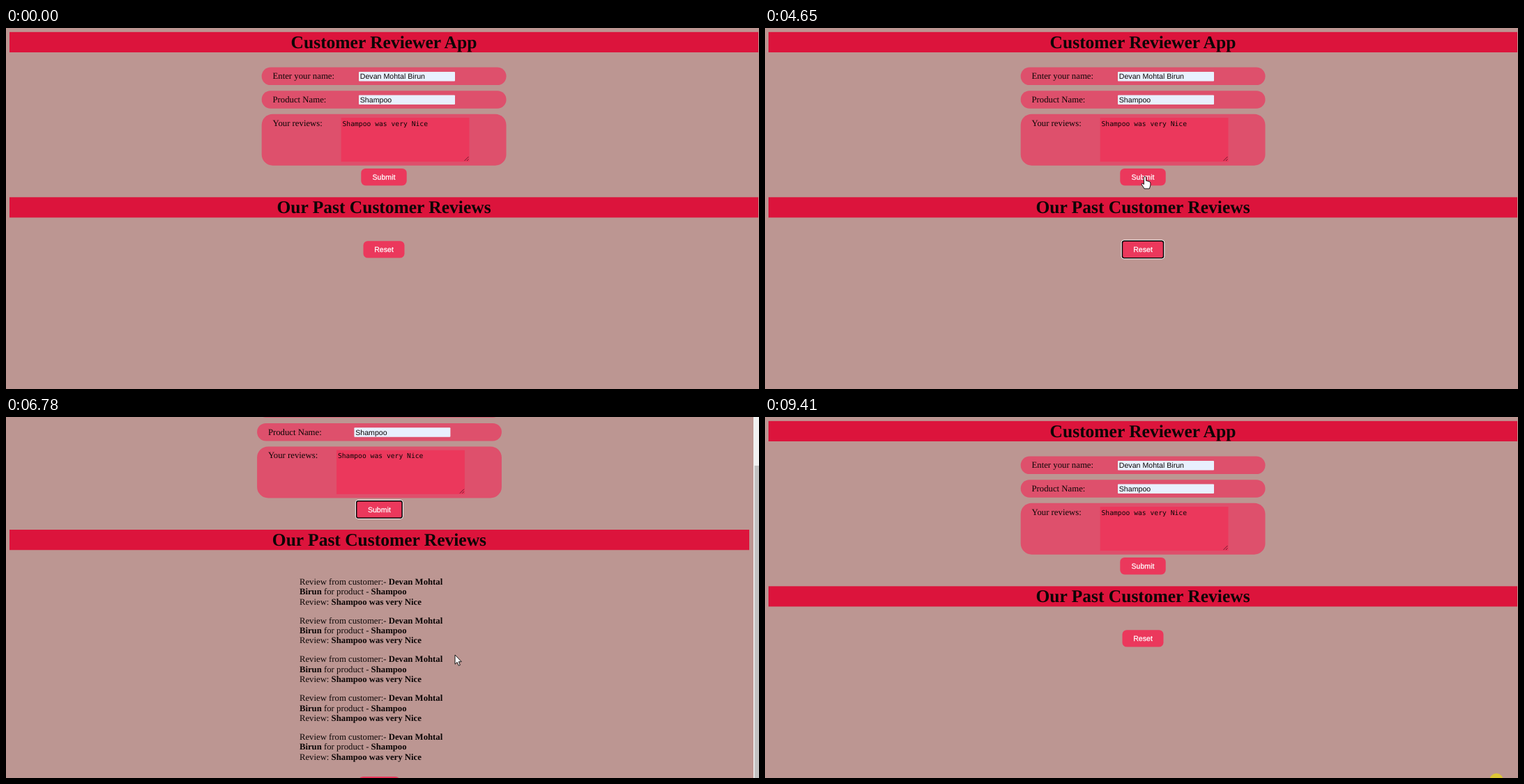
These frames come from a looping animation (1080 px wide and 519 px high, 9.48 s). An HTML page:

```html
<!DOCTYPE html>
<html lang="en">
<head>
<meta charset="utf-8">
<title>Customer Reviewer App</title>
<style>
  html, body { margin: 0; width: 100%; height: 100%; overflow: hidden; background: #bc9692; }
  svg { display: block; width: 1080px; height: 519px; }
  text { font: 12.75px "Liberation Serif", serif; fill: #0c0606; text-rendering: geometricPrecision; white-space: pre; }
  .bold { font-weight: bold; }
  text.title { font-size: 25.5px; font-weight: bold; text-anchor: middle; }
  text.field { font: 10.62px "Liberation Sans", sans-serif; }
  text.mono { font: 9.7px "DejaVu Sans Mono", monospace; }
  text.button { font: 10.62px "Liberation Sans", sans-serif; fill: #fff; stroke: #fff; stroke-width: .25; text-anchor: middle; }
  .bar { fill: #dc143c; }
  .row { fill: #de506c; }
  .input { fill: #e8f0fe; }
  .hot { fill: #eb385c; }
  .ring { fill: #000; stroke: #fff; }
  .grip { fill: none; stroke: #4a1424; stroke-width: .8; }
</style>
</head>
<body>
<svg viewBox="0 0 1080 519">
  <g id="page"></g>
  <g id="scrollbar">
    <rect x="1072" width="8" height="519" fill="#f1f1f1"/>
    <rect id="thumb" x="1073.6" width="7" fill="#c1c1c1"/>
  </g>
  <circle id="spot" r="9.7" fill="#e0cb2c" opacity=".9"/>
  <g id="cursor" stroke="#000" stroke-width=".9" stroke-linejoin="round" fill="#fff">
    <path id="arrow" d="M0 0V13.3L3.1 10.6L5.2 15.4L7.3 14.5L5.3 9.8H9.3Z"/>
    <path id="hand" d="M-1.6 1.6Q0-.8 1.6 1.6V6.5L6 7.6Q7.9 8.2 7.9 10.5V13L6.4 18H-1L-5 11.6Q-4.6 9.2-1.6 11.8Z"/>
    <path id="beam" fill="none" stroke="#cfabab" d="M-3-6.5H3M0-6.5V6.5M-3 6.5H3"/>
  </g>
</svg>
<script>
const LOOP = 9480;
const TICK = 77;
const CENTER = 542;
const NAME = ["Devan Mohtal", "Birun"];
const PRODUCT = "Shampoo";
const REVIEW = "Shampoo was very Nice";
const LINE = 14.4, REVIEW_STEP = 55.8, ROW_STEP = 33.55;
const SUBMIT_Y = 202, RESET_Y = 306.2, BUTTON_H = 24.4;
const VIEW_H = 541, EMPTY_PAGE_H = 359, MAX_SCROLL = 84.4;

const clicks = [], glides = [];
const click = (button, down, hold = 80) => clicks.push({ button, down, up: down + hold });
const glide = (start, end, ...stops) => {
  const from = glides.length ? glides[glides.length - 1].path.slice(-1)[0] : [1100, 552];
  glides.push({ start, end, path: [from, ...stops] });
};

glide(440, 1060, [520, 220]);
click("submit", 1440);
click("submit", 2150, 150);
glide(2450, 2680, [549, 458]);
glide(2910, 3400, [541, 373], [556, 457]);
glide(3550, 3630, [551, 440]);
click("reset", 3780);
glide(4010, 4400, [522, 290], [534, 179]);
glide(4570, 4650, [545, 213]);
click("submit", 4800);
click("submit", 5190, 150);
click("submit", 5510, 150);
click("submit", 5910, 70);
click("submit", 6310, 70);
glide(6610, 6780, [644, 342]);
glide(6850, 7610, [546, 513]);
click("reset", 8010, 170);
glide(8410, 9100, [690, 489], [1049, 522]);
click("", 9410);

const $ = id => document.getElementById(id);
const show = (el, on) => el.setAttribute("display", on ? "inline" : "none");
const move = (el, x, y) => el.setAttribute("transform", `translate(${x} ${y})`);

const rect = (cls, x, y, w, h, r = 0) =>
  `<rect class="${cls}" x="${x}" y="${y}" width="${w}" height="${h}" rx="${r}"/>`;
const text = (cls, x, y, content) => `<text class="${cls}" x="${x}" y="${y}">${content}</text>`;
const bold = content => `<tspan class="bold">${content}</tspan>`;

function button(id, label, w) {
  const grown = (cls, d, r) => rect(cls, CENTER - w / 2 - d, -d, w + 2 * d, BUTTON_H + 2 * d, r);
  return `<g id="${id}">${grown("hot", 0, 6.4)}` +
    `<g id="${id}Ring">${grown("ring", 1.3, 3.6)}${grown("hot", -0.7, 2)}</g>` +
    text("button", CENTER, 15.8, label) + "</g>";
}

function row(i, label, height, radius, content) {
  return `<g transform="translate(0 ${56.6 + i * ROW_STEP})">` +
    rect("row", 366.7, 0, 350.8, height, radius) +
    text("", 382.5, 16.9, label) + content + "</g>";
}

const field = value => rect("input", 506, 6.4, 138, 13.5, 1) + text("field", 507.8, 16.9, value);

const textarea = rect("hot", 480.7, 5.3, 183.8, 63.2) + text("mono", 482.5, 16.9, REVIEW) +
  `<path class="grip" d="M657.5 67.3l6-6M661 67.3l2.5-2.5"/>`;

const review = (_, i) => `<g class="review">` + [
  "Review from customer:- " + bold(NAME[0]),
  bold(NAME[1]) + " for product - " + bold(PRODUCT),
  "Review: " + bold(REVIEW),
].map((line, k) => text("", 427.5, 322 + i * REVIEW_STEP + k * LINE, line)).join("") + "</g>";

$("page").innerHTML =
  rect("bar", 5, 5.8, 1074, 29.2) + rect("bar", 5, 243.3, 1074, 29.2) +
  `<g id="content">` +
  text("title", CENTER, 28.9, "Customer Reviewer App") +
  row(0, "Enter your name:", 25.5, 12.7, field(NAME.join(" "))) +
  row(1, "Product Name:", 25.5, 12.7, field(PRODUCT)) +
  row(2, "Your reviews:", 74, 15.9, textarea) +
  button("submit", "Submit", 65.4) +
  text("title", CENTER, 266.4, "Our Past Customer Reviews") +
  Array.from({ length: 5 }, review).join("") +
  button("reset", "Reset", 59) + "</g>";

const bars = document.querySelectorAll(".bar");
const reviews = document.querySelectorAll(".review");
move($("submit"), 0, SUBMIT_Y);

function along(path, p) {
  const at = p * (path.length - 1);
  const i = Math.min(Math.floor(at), path.length - 2);
  return path[i].map((v, k) => v + (path[i + 1][k] - v) * (at - i));
}

// The pointer advances in ticks, the first one at the start of a glide
function cursorAt(t) {
  const { start, end, path } = glides.filter(g => t >= g.start).pop() || glides[0];
  const ticks = Math.floor((t - start) / TICK) + 1;
  const p = t >= end ? 1 : Math.min(1, ticks * TICK / (end - start + TICK));
  return along(path, t < start ? 0 : p);
}

function cursorKind(x, y, count, resetY) {
  const inside = (halfWidth, top, height) => Math.abs(x - CENTER) < halfWidth && y >= top && y <= top + height;
  if (inside(32.7, SUBMIT_Y, BUTTON_H) || inside(29.5, resetY - 1.5, BUTTON_H + 1.5)) return "hand";
  const overReview = count && inside(94, 311, count * REVIEW_STEP - 13);
  return inside(154, 245, 26) || inside(100, 129, 63) || overReview ? "beam" : "arrow";
}

// One wheel notch, easing out in three steps
function scrollAt(t) {
  const p = Math.min(1, Math.max(0, Math.floor((t - 6640) / 70) / 3));
  return MAX_SCROLL * (1 - (1 - p) ** 3);
}

function draw(t) {
  const pressed = clicks.filter(c => t >= c.down).pop();
  const count = clicks.filter(c => t >= c.up)
    .reduce((n, c) => c.button === "submit" ? n + 1 : 0, 0);
  const scroll = count ? scrollAt(t) : 0;
  const pageHeight = EMPTY_PAGE_H + count * REVIEW_STEP;
  const overflow = pageHeight > VIEW_H;
  const shift = overflow ? -6.6 : 0;
  const resetY = RESET_Y + (count ? 13 + count * REVIEW_STEP : 0);

  move($("page"), 0, -scroll);
  move($("content"), shift, 0);
  move($("reset"), 0, resetY);
  bars.forEach(bar => bar.setAttribute("width", overflow ? 1061 : 1074));
  reviews.forEach((el, i) => show(el, i < count));
  for (const id of ["submit", "reset"]) show($(id + "Ring"), pressed && pressed.button === id);

  show($("scrollbar"), overflow);
  $("thumb").setAttribute("y", 1 + scroll * VIEW_H / pageHeight);
  $("thumb").setAttribute("height", VIEW_H ** 2 / pageHeight);

  const [x, y] = cursorAt(t);
  const kind = cursorKind(x - shift, y + scroll, count, resetY);
  move($("cursor"), x, y);
  move($("spot"), x, y);
  for (const id of ["arrow", "hand", "beam"]) show($(id), id === kind);
  show($("spot"), pressed && t < pressed.up);
}

function tick() {
  draw(performance.now() % LOOP);
  requestAnimationFrame(tick);
}
tick();
</script>
</body>
</html>
```
